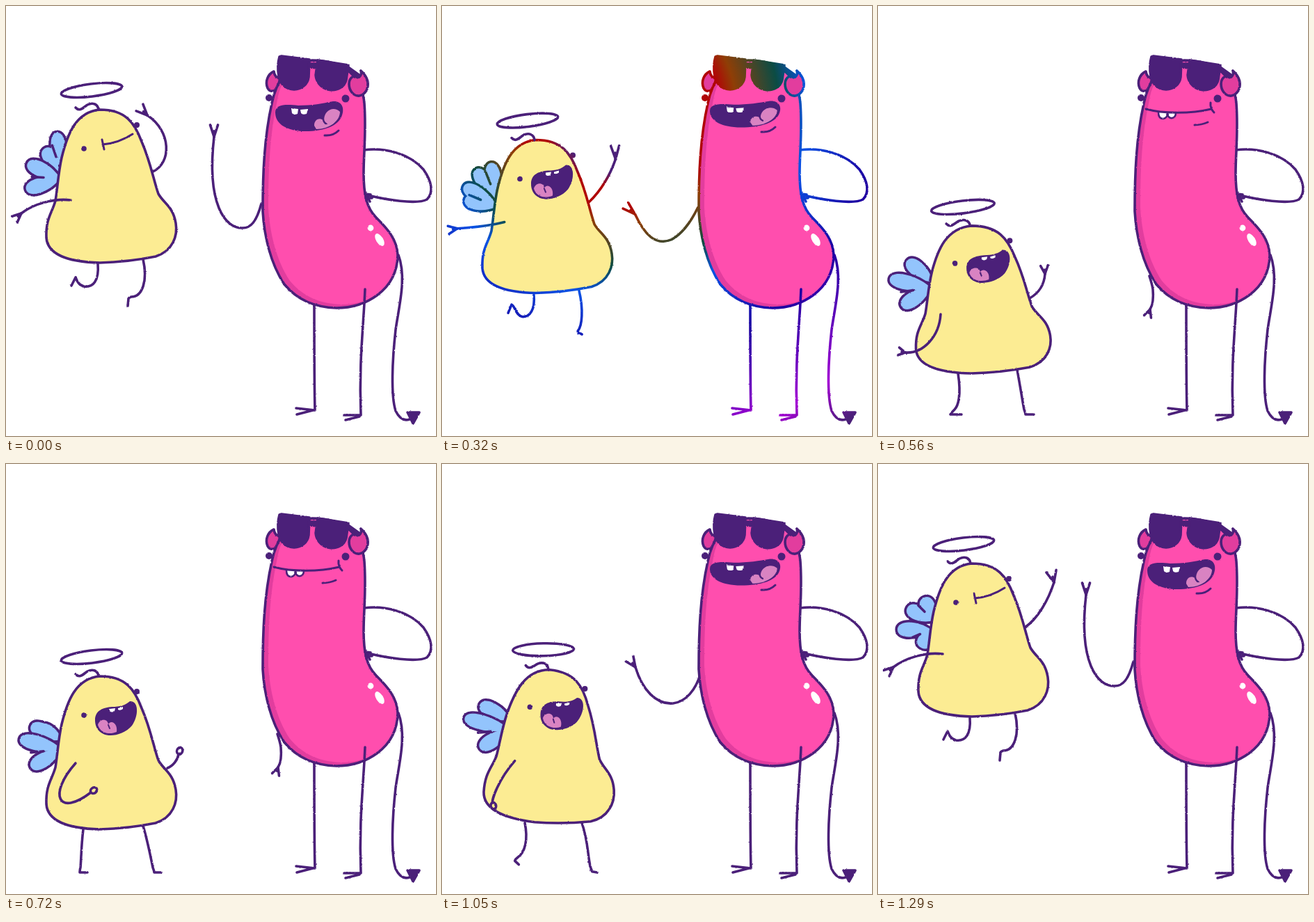
Recreate the animation shown at these times as an HTML page with a canvas. Size 618x618 px, loop 1370 ms.

```html
<!DOCTYPE html>
<html lang="en">
<head>
<meta charset="utf-8">
<title>High five</title>
<style>
  html, body { margin: 0; width: 100%; height: 100%; overflow: hidden; background: #fff; }
  canvas { display: block; width: 618px; height: 618px; filter: url(#rough); }
  svg { position: absolute; width: 0; height: 0; }
</style>
</head>
<body>
<canvas id="stage" width="618" height="618"></canvas>
<svg aria-hidden="true">
  <filter id="rough" x="0" y="0" width="100%" height="100%" color-interpolation-filters="sRGB">
    <feTurbulence type="fractalNoise" baseFrequency="0.35" numOctaves="2" seed="4" result="n"/>
    <feDisplacementMap in="SourceGraphic" in2="n" scale="2" xChannelSelector="R" yChannelSelector="G"/>
  </filter>
</svg>
<script>
const ctx = document.getElementById('stage').getContext('2d');
const LOOP = 1370;
const TIMES = [0, 80, 160, 240, 320, 400, 480, 560, 640, 720, 890, 970, 1050, 1130, 1210, 1290];
const INK = '#4b2079', YELLOW = '#fcec93', PINK = '#ff4eae', DARK_PINK = '#e23d9e';
const BLUE = '#93c4fc', TONGUE = '#d983c2';

// Angel poses. body: dx, dy, scale x, scale y, turn.
// wings: two of (root, tip, tip). hands: angle, finger length, fist radius, spread.
const fly = {
  body: '0 0 1 1 0',
  wings: '80 240 73 182 55 205 78 248 31 226 29 264',
  left: 'M93 279 C70 276 40 284 22 298', leftHand: '138 14 0 24',
  right: 'M211 238 C238 226 238 180 203 157', rightHand: '-135 17 0 24',
  legs: 'M132 371 C134 395 125 405 112 403 C104 401 102 395 100 390 L94 402' +
        'M197 364 C204 395 196 418 180 418 C177 419 176 420 176 421 L175 431'
};
const clap = { ...fly, right: 'M211 238 C230 226 250 212 268 195', rightHand: '-92 27 0 12' };
const fall = {
  body: '0 80 1 1 0',
  wings: '80 316 68 262 43 260 80 322 32 286 36 291',
  left: 'M87 337 C78 347 50 347 22 338', leftHand: '198 14 0 24',
  right: 'M212 318 C230 295 234 270 234 241', rightHand: '-93 14 0 22',
  legs: 'M132 452 C134 470 128 483 118 483 C108 482 108 462 100 462 L96 474' +
        'M197 447 C203 470 206 495 208 508 C210 512 213 512 216 511 L223 506'
};
const land = {
  body: '0 159 1.037 .964 0',
  wings: '78 396 42 366 46 370 76 405 17 392 34 432',
  left: 'M90 443 C88 475 65 500 39 498', leftHand: '190 11 0 30',
  right: 'M218 420 C232 412 239 400 240 385', rightHand: '-95 13 0 24',
  legs: 'M115 528 C120 560 115 575 110 580 C107 583 105 585 104 587 L120 587' +
        'M200 523 C205 550 208 570 210 580 C211 583 212 585 212 587 L224 587'
};
const crouch = {
  body: '0 156 1 1 0',
  wings: '80 396 36 376 46 378 80 410 20 395 36 436',
  left: 'M100 430 C60 475 75 508 122 472', leftHand: '-35 6 5 24',
  right: 'M232 437 C240 434 247 425 248 417', rightHand: '-70 6 5 24',
  legs: 'M111 525 C108 550 108 570 107 580 C106 583 106 585 106 587 L117 587' +
        'M197 520 C203 540 208 565 211 580 C212 583 213 585 213 587 L223 587'
};
const lean = {
  body: '-3 143 1 1 8.5',
  wings: '106 352 64 330 68 335 106 368 39 350 64 395',
  left: 'M107 425 C90 445 70 470 48 494', leftHand: '130 6 4.6 24',
  right: 'M215 420 C215 425 210 430 205 435', rightHand: '-90 4 0 24',
  legs: 'M123 511 C132 535 125 552 110 558 C107 559 105 560 104 562 L107 570' +
        'M203 514 C213 540 210 560 214 577 C215 580 216 583 217 585 L223 587'
};
const rise = {
  body: '0 -6 1 1 0',
  wings: '80 225 42 207 66 192 76 238 28 238 62 264',
  left: 'M93 273 C70 270 40 278 22 292', leftHand: '138 14 0 24',
  right: 'M211 235 C230 222 245 195 253 170', rightHand: '-104 18 0 24',
  legs: 'M132 365 C134 389 125 399 112 397 C104 395 102 389 100 384 L94 396' +
        'M197 358 C204 389 196 412 180 412 C177 413 176 414 176 415 L175 426'
};
const ANGEL = [[0, fly], [160, clap], [400, fall], [560, land], [720, crouch], [890, crouch],
  [1130, lean], [1290, rise], [LOOP, fly]];

// Demon poses. body: dy, scale x, knee bend.
const wait = {
  body: '0 1 0',
  arm: 'M367 284 C360 310 352 319 340 319 C315 320 288 285 299 188', hand: '-90 18 0 18',
  tail: 'M564 358 C576 390 565 430 560 465 C555 510 553 560 560 582 C565 592 572 597 580 594',
  tip: 'M577 584 L594 584 L585 600 Z'
};
const slap = { ...wait, arm: 'M367 290 C350 308 335 315 318 315 C285 313 275 260 273 194', hand: '-88 26 0 12' };
const swing = { ...wait, arm: 'M368 290 C363 315 350 340 340 353 C325 372 305 387 281 387', hand: '-180 13 0 22' };
const hang = { ...wait, arm: 'M390 388 C392 394 394 400 395 407 C396 418 396 428 391 436', hand: '-251 12 0 26' };
const dip = {
  body: '11 1 18',
  arm: 'M397 407 C397 414 397 420 397 427 C396 436 396 446 397 454', hand: '-282 17 0 20',
  tail: 'M565 371 C571 420 553 480 552 530 C553 560 556 580 566 590 C574 597 584 596 592 586',
  tip: 'M582 580 L602 577 L598 597 Z'
};
const lift = { ...wait, arm: 'M372 300 C365 325 350 342 332 344 C308 346 288 325 278 292', hand: '-125 16 0 24' };
const stretch = {
  body: '-3 .987 0',
  arm: 'M371 293 C365 310 355 316 345 316 C322 316 294 280 307 183', hand: '-74 18 0 26',
  tail: 'M561 355 C573 387 562 427 557 462 C552 507 550 560 557 580 C562 591 569 597 577 594',
  tip: 'M574 584 L591 584 L582 600 Z'
};
const DEMON = [[0, wait], [160, slap], [400, swing], [560, hang], [720, hang], [890, dip],
  [1050, lift], [1130, stretch], [1290, wait], [LOOP, wait]];

const NUM = /-?\d*\.?\d+/g;
const nums = s => s.match(NUM).map(Number);
const lerp = (a, b, u) => a + (b - a) * u;

function mix(a, b, u) {
  const to = nums(b);
  let i = 0;
  return a.replace(NUM, n => lerp(+n, to[i++], u).toFixed(3));
}

function poseAt(keys, t) {
  let i = 0;
  while (i < keys.length - 2 && keys[i + 1][0] <= t) i++;
  const [t0, a] = keys[i], [t1, b] = keys[i + 1];
  let u = (t - t0) / (t1 - t0);
  if (t0 === 160) u **= 1.5; // hang in the air before dropping
  return Object.fromEntries(Object.keys(a).map(k => [k, mix(a[k], b[k], u)]));
}

// Ring of colour spreading from the point where the hands meet.
function inkAt(t) {
  if (t < 160 || t > 480) return INK;
  const u = (t - 160) / 240, size = 900;
  const near = [-60, -40, 18, 36, 60, 86, 104, 124, 142];
  const far = [170, 192, 206, 232, 312, 362, 500, 680, 760];
  const hues = [INK, '#b00606', '#b00606', '#8f3e06', '#0b4c44', '#0a52e4', '#1c00a0', '#a400d4', INK];
  const x = lerp(268, 250, u), y = lerp(180, 130, u);
  const g = ctx.createRadialGradient(x, y, 0, x, y, size);
  hues.forEach((c, i) => {
    const r = lerp(near[i], far[i], u);
    g.addColorStop(Math.min(1, Math.max(0, r / size)), c);
  });
  return g;
}

let ink = INK;

function shape(d, m) {
  const p = new Path2D();
  p.addPath(new Path2D(d), m);
  return p;
}
function line(d, m, color = ink, width = 3.6) {
  ctx.strokeStyle = color;
  ctx.lineWidth = width;
  ctx.stroke(shape(d, m));
}
function fill(d, color, m) {
  ctx.fillStyle = color;
  ctx.fill(shape(d, m));
}
function oval(x, y, rx, ry = rx, deg = 0) {
  ctx.beginPath();
  ctx.ellipse(x, y, rx, ry, deg * Math.PI / 180, 0, 7);
}
function dot(x, y, r, m, color = INK) {
  const p = m.transformPoint({ x, y });
  oval(p.x, p.y, r);
  ctx.fillStyle = color;
  ctx.fill();
}

function limb(d, hand) {
  const [x, y] = nums(d).slice(-2), [deg, len, fist, spread] = nums(hand);
  line(d);
  if (fist > 2) {
    const a = deg * Math.PI / 180;
    oval(x + Math.cos(a) * fist, y + Math.sin(a) * fist, fist, fist * .8, deg);
    ctx.stroke();
    return;
  }
  for (const k of [-1, 0, 1]) {
    const a = (deg + k * spread) * Math.PI / 180, l = k ? len : len * .45;
    line(`M${x} ${y} L${x + Math.cos(a) * l} ${y + Math.sin(a) * l}`);
  }
}

function petal(rx, ry, x, y) {
  const dx = x - rx, dy = y - ry, k = 14 / Math.hypot(dx, dy), nx = -dy * k, ny = dx * k;
  return `M${rx} ${ry} C${rx + dx * .4 + nx} ${ry + dy * .4 + ny} ${x + nx} ${y + ny} ${x} ${y}` +
    `C${x - nx} ${y - ny} ${rx + dx * .4 - nx} ${ry + dy * .4 - ny} ${rx} ${ry}Z`;
}
function wing([rx, ry, ax, ay, bx, by]) {
  const both = petal(rx, ry, ax, ay) + petal(rx, ry, bx, by);
  line(both, undefined, ink, 7);
  fill(petal(rx, ry, ax, ay), BLUE);
  fill(petal(rx, ry, bx, by), BLUE);
  if (Math.hypot(ax - bx, ay - by) < 16) return;
  const mx = (ax + bx) / 2, my = (ay + by) / 2;
  line(`M${lerp(rx, mx, .85)} ${lerp(ry, my, .85)} L${lerp(rx, mx, .5)} ${lerp(ry, my, .5)}`);
}

const BELL = 'M135 149 C100 152 88 185 80 218 C75 240 74 262 71 280 C66 298 57 305 58 333 ' +
  'C60 360 95 368 135 369 C175 368 200 363 215 360 C240 352 247 330 244 312 ' +
  'C240 288 227 284 219 270 C212 250 208 225 195 195 C185 168 172 149 135 149Z';

function drawAngel(t) {
  const p = poseAt(ANGEL, t);
  const [dx, dy, sx, sy, turn] = nums(p.body);
  const m = new DOMMatrix().translate(151 + dx, 369 + dy).rotate(turn).scale(sx, sy).translate(-151, -369);
  const w = nums(p.wings);
  wing(w.slice(0, 6));
  wing(w.slice(6));
  limb(p.right, p.rightHand);
  line(p.legs);
  dot(188, 171, 4, m, ink);
  fill(BELL, YELLOW, m);
  line(BELL, m);

  const halo = m.transformPoint({ x: 123, y: 121 });
  oval(halo.x, halo.y, 44 * sx, 9, turn - 7);
  ctx.strokeStyle = INK;
  ctx.stroke();
  line('M100 146 C106 153 112 145 117 142 C125 138 132 141 133 149', m, INK);
  dot(112, 205, 3.8, m);

  if (t >= 320 && t < 1290) {
    fill('M128 212 C128 198 140 194 152 193 C164 193 171 191 178 185 C191 184 191 206 181 220 ' +
      'C170 233 150 237 140 232 C131 228 128 220 128 212Z', INK, m);
    fill('M132 219 C134 210 146 209 147 218 C151 211 161 217 159 229 C150 233 136 232 132 219Z', TONGUE, m);
    line('M147 219 L149 224', m, INK, 2);
    fill('M149 196 L157 195 L156 199 Q152 202 149 199Z M161 195 L168 193 L168 196 Q164 199 161 197Z', '#fff', m);
  } else {
    line('M138 192 L141 206 M139 199 Q162 197 182 184', m, INK, 3);
  }
  limb(p.left, p.leftHand);
}

const BEAN = 'M440 78 C402 85 388 110 382 140 C371 190 369 240 369 295 C371 330 380 370 400 400 ' +
  'C420 424 445 433 475 434 C515 434 562 410 563 358 C562 335 548 320 532 304 ' +
  'C518 290 514 270 514 240 C514 210 518 180 515 140 C512 105 490 78 440 78Z';

function demonMouth(t, m) {
  if (t >= 560 && t < 1050) {
    const teeth = 'M403 153 Q403 162 410 162 Q416 161 416 154 Q417 162 423 161 Q428 160 428 153';
    fill(teeth, '#fff', m);
    line(teeth, m, INK, 2.6);
    line('M385 148 C410 155 450 155 479 148 M478 139 Q477 147 483 153 M455 171 Q465 171 474 167', m, INK, 3);
    return;
  }
  const flat = t >= 320 && t < 1290;
  const mm = flat ? m.multiply(new DOMMatrix([1.04, 0, 0, .88, -17.5, 16])) : m;
  fill('M387 153 C387 141 402 141 420 143 C440 143 455 140 470 137 C482 136 487 146 483 157 ' +
    'C478 173 455 181 425 180 C400 178 387 168 387 153Z', INK, mm);
  fill('M443 172 C443 161 454 160 457 166 C456 150 471 143 480 152 C480 165 465 177 446 177Z', TONGUE, mm);
  line('M456 162 Q456 167 460 169', mm, INK, 2.4);
  fill('M410 147 L420 148 L419 155 Q413 157 411 154Z M423 149 L434 148 L432 155 Q426 157 424 154Z', '#fff', mm);
  line('M458 186 Q470 187 478 179', flat ? m.translate(1, -5) : m, INK, 3);
}

function drawDemon(t) {
  const p = poseAt(DEMON, t);
  const [dy, sx, bend] = nums(p.body);
  const m = new DOMMatrix([sx, 0, 0, 1, 467 * (1 - sx), dy]);

  line('M514 207 C545 203 580 212 600 235 C612 252 615 268 605 278 C590 286 545 278 520 272', m);
  line(p.tail);
  fill(p.tip, ink);
  line(p.tip);
  limb(p.arm, p.hand);
  line(`M${443 - bend / 6} ${430 + dy} C${443 - bend} 480 ${443 - bend} 540 444 581 L417 578 M441 581 L418 587`);
  dot(378, 132, 5, m, ink);

  const leftEar = 'M385 94 C376 98 372 109 376 118 C379 124 385 123 390 119 L394 104 Q386 103 385 94Z';
  fill(leftEar, DARK_PINK, m);
  line(leftEar, m);

  const body = shape(BEAN, m);
  ctx.fillStyle = DARK_PINK;
  ctx.fill(body);
  ctx.save();
  ctx.clip(body);
  fill(BEAN, PINK, m.translate(8, -5));
  ctx.restore();
  line(BEAN, m);

  const rightEar = 'M493 112 C493 122 500 130 508 129 C520 127 527 108 510 93 ' +
    'C512 102 506 105 499 101 C494 104 493 108 493 112Z';
  fill(rightEar, DARK_PINK, m);
  line(rightEar, m);

  const shades = 'M396 72 L436 77 L435 102 C432 125 397 127 392 101 C390 90 391 80 393 73Z ' +
    'M448 78 L492 85 L489 106 C484 127 449 126 445 100Z M435 83 L448 83 L448 89 L435 88Z';
  fill(shades, ink, m);
  line(shades, m);
  line('M492 90 L506 100', m, ink, 7);
  dot(488, 133, 5.5, m);
  demonMouth(t, m);

  dot(524, 319, 4.4, m, '#fff');
  const shine = m.transformPoint({ x: 537, y: 336 });
  oval(shine.x, shine.y, 5, 10, -32);
  ctx.fillStyle = '#fff';
  ctx.fill();

  line('M516 268 L523 281 M517 276 L526 276 M516 270 L524 271 M518 280 L521 272', m);
  line(`M516 ${407 + dy} C${514 - bend} ${460 + dy} ${507 - bend} 510 510 588 L486 588 M508 590 L488 595`);
}

function draw(t) {
  ctx.clearRect(0, 0, 618, 618);
  ctx.lineCap = ctx.lineJoin = 'round';
  ink = inkAt(t);
  drawDemon(t);
  drawAngel(t);
}

let shown = -1;
const start = performance.now();
function tick() {
  const t = (performance.now() - start) % LOOP;
  const i = Math.max(0, TIMES.findLastIndex(s => s <= t));
  if (i !== shown) draw(TIMES[shown = i]);
  requestAnimationFrame(tick);
}
tick();
</script>
</body>
</html>
```
